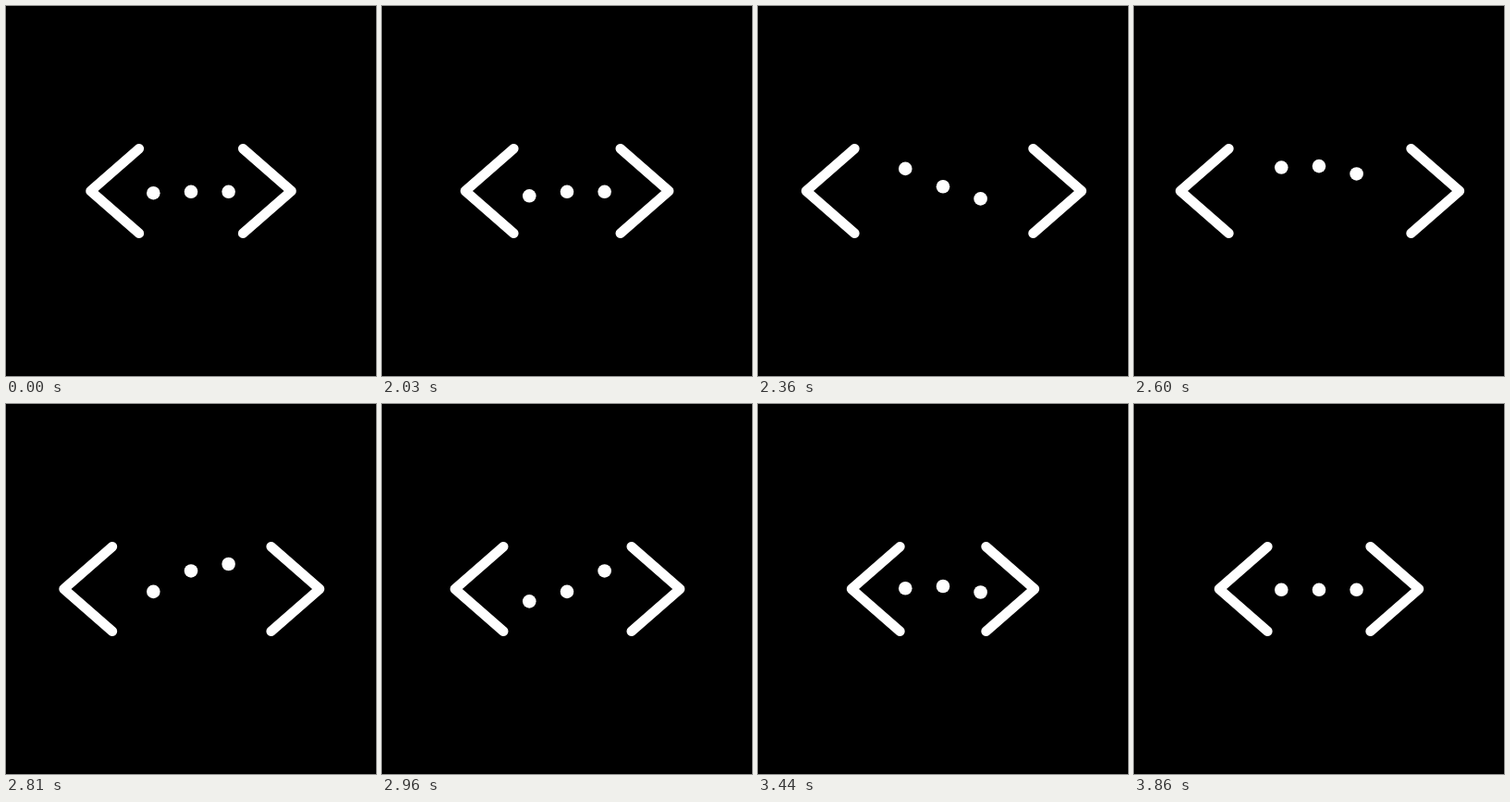
Write an HTML page that moves like this. It is 400 px wide and 400 px high and loops after 3920 ms.

```html
<!DOCTYPE html>
<html>
<head>
<meta charset="utf-8">
<style>
html, body { margin: 0; height: 100%; overflow: hidden; background: #000; }
svg { display: block; width: 100vw; height: 100vh; }
path { fill: none; stroke: #fff; stroke-width: 10.5; stroke-linecap: round; stroke-linejoin: round; }
circle { fill: #fff; }
</style>
</head>
<body>
<svg viewBox="0 0 400 400">
  <path id="left" d="M144.4 154.2L92 200l52.4 45.8"/>
  <path id="right" d="M255.6 154.2L308 200l-52.4 45.8"/>
  <circle cx="159.3" r="7.3"/>
  <circle cx="200" r="7.3"/>
  <circle cx="240.6" r="7.3"/>
</svg>
<script>
const LOOP = 3920, START = 2000, STEP = 30, LAST = 63, STAGGER = 5;
const REST = 200.8;

// Keys: [step, value, optional front-loading of the ease into this key]
const spread = reach => [[0, 0], [15, reach], [20.5, reach], [45, -14], [55, 0]];
const leftKeys = spread(42), rightKeys = spread(44);
const bounce = [[0, REST], [4, 209.8], [17.5, 173, 1.6], [19.5, 173], [32.3, 213.5], [44, 197], [53, REST]];

const left = document.getElementById('left');
const right = document.getElementById('right');
const dots = document.querySelectorAll('circle');

function valueAt(keys, n) {
  if (n <= keys[0][0]) return keys[0][1];
  const i = keys.findIndex(key => n < key[0]);
  if (i < 0) return keys[keys.length - 1][1];
  const [n0, v0] = keys[i - 1], [n1, v1, power = 1] = keys[i];
  const u = 1 - (1 - (n - n0) / (n1 - n0)) ** power;
  return v0 + (v1 - v0) * u * u * (3 - 2 * u);
}

function draw() {
  const t = performance.now() % LOOP;
  // The first pose holds, then the motion advances in fixed steps.
  const n = Math.min(LAST, 1 + Math.max(0, Math.floor((t - START) / STEP)));
  left.setAttribute('transform', `translate(${-valueAt(leftKeys, n)} 0)`);
  right.setAttribute('transform', `translate(${valueAt(rightKeys, n)} 0)`);
  dots.forEach((dot, i) => dot.setAttribute('cy', valueAt(bounce, n - i * STAGGER)));
  requestAnimationFrame(draw);
}
draw();
</script>
</body>
</html>
```
